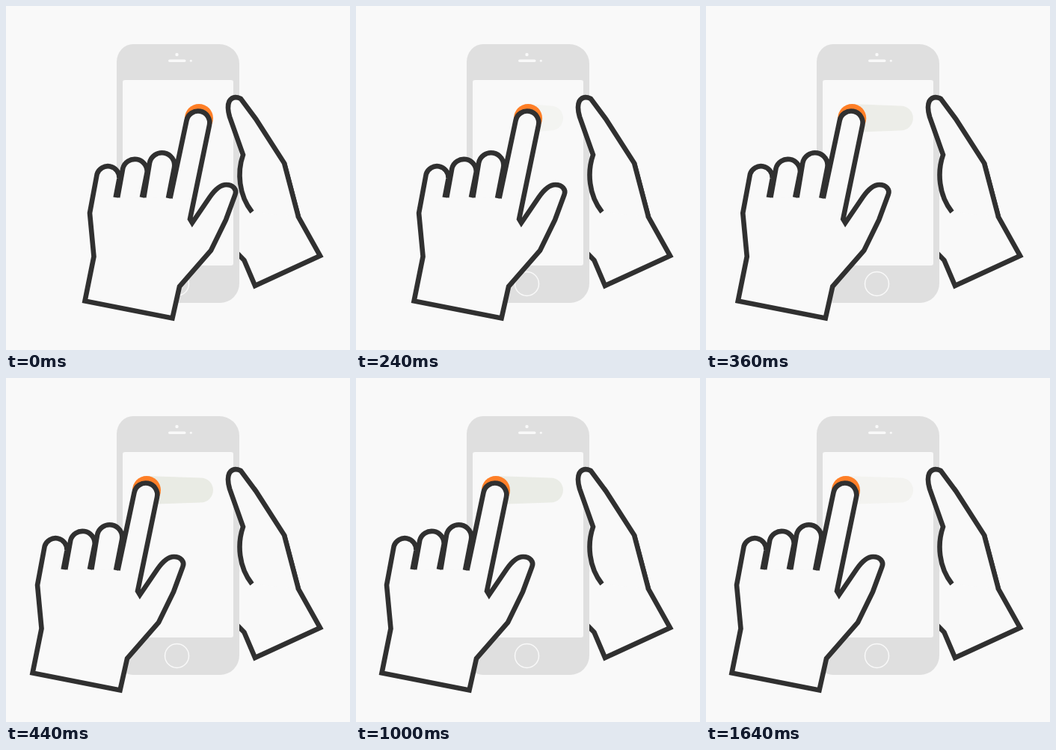
Recreate the animation shown at these times as an HTML page. Size 460x460 px, loop 1680 ms.

```html
<!DOCTYPE html>
<html lang="en">
<head>
<meta charset="utf-8">
<title>Swipe left</title>
<style>
  html, body { margin: 0; height: 100%; overflow: hidden; background: #f9f9f9; }
  svg { display: block; width: 100vw; height: 100vh; }
  .line { fill: none; stroke: #303030; stroke-width: 6.6; stroke-miterlimit: 10; }
  .skin { fill: #f9f9f9; }
</style>
</head>
<body>
<svg viewBox="0 0 460 460">
  <!-- holding hand, behind the phone -->
  <path class="line" d="M300 321L318.500 340L333 374L420 334L391 282L372 210"/>

  <!-- phone -->
  <path fill="#dfdfdf" d="M170 51H285A27 26 0 0 1 312 77V371A26 26 0 0 1 286 397H170
    A22 24 0 0 1 148 373V75A22 24 0 0 1 170 51Z"/>
  <rect class="skin" x="156" y="99" width="148" height="248" rx="3"/>
  <g class="skin">
    <circle cx="228.5" cy="65" r="2.2"/>
    <rect x="217" y="71.5" width="23.5" height="3.6" rx="1.8"/>
    <circle cx="247.3" cy="73.3" r="1.5"/>
  </g>
  <circle cx="228.5" cy="371.5" r="16" fill="none" stroke="#f9f9f9" stroke-width="1.5"/>

  <!-- holding hand, in front of the phone -->
  <path class="line" style="fill:#f9f9f9" d="M391 282L372 210L334 151L314 124
    C307 120.500 302 121.500 298.500 127.500C295.500 134 297 141 299 148L317 199
    C309 222 311 253 329 275.500"/>

  <path id="trail" fill="#e6e8e0"/>

  <!-- swiping hand; the rect backs the seams between the fingers -->
  <g id="hand">
    <circle cx="258" cy="150" r="19" fill="#ff7f27"/>
    <rect class="skin" x="149" y="240" width="71" height="30"/>
    <path class="line" style="fill:#f9f9f9" d="
      M149.200 256L156.300 217A16.500 16.500 0 0 1 188.700 222L181.900 256
      M184.300 256L192 210A16.600 16.600 0 0 1 225 216L217 257
      M219.500 257L241.500 153A15.500 15.500 0 0 1 272 159.200L246 285L249 290L272.500 255.500
      C279.500 245.500 286.500 239 294.500 239C304 239 309 246 306.500 252L294 286L274 327L232 375
      L222.500 417.500L105.500 394.500L117.500 335L112 277L121.700 224.700
      A15.300 15.300 0 0 1 151.500 230.500L146.600 256"/>
  </g>
</svg>
<script>
const LOOP = 1680, SWIPE = 520, STEP = 40, REACH = 71;
const trail = document.getElementById('trail');
const hand = document.getElementById('hand');

const easeInOut = p => p < .5 ? 4 * p ** 3 : 1 - 4 * (1 - p) ** 3;

function draw(now) {
  const t = Math.floor(now % LOOP / STEP) * STEP;
  const shift = -REACH * easeInOut(Math.min(t / SWIPE, 1));
  const x = 258 + shift;
  const alpha = t < SWIPE
    ? Math.max(0, (t - 80) / (SWIPE - 80))
    : 1 - .64 * (t - SWIPE) / (LOOP - SWIPE);

  hand.setAttribute('transform', `translate(${shift} 0)`);
  trail.setAttribute('d',
    `M${x} 131L260.5 133.5A16.5 16.5 0 0 1 260.5 166.5L${x} 169A19 19 0 0 1 ${x} 131Z`);
  trail.setAttribute('opacity', alpha);
  requestAnimationFrame(draw);
}
draw(0);
</script>
</body>
</html>
```
